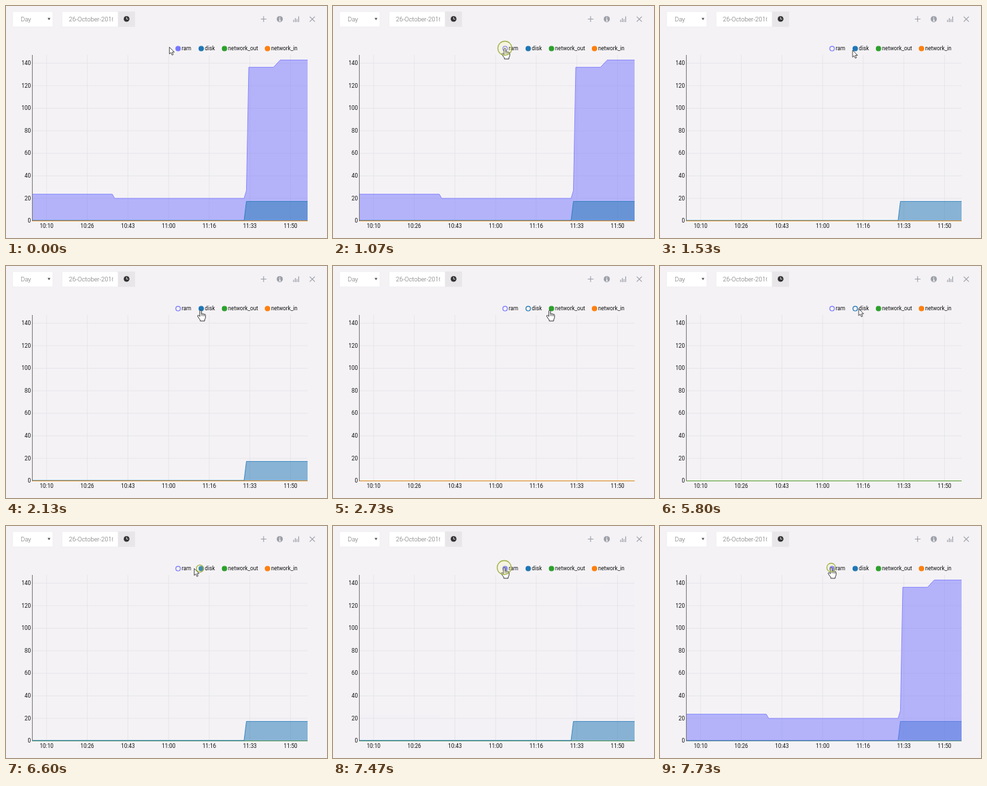
Write an HTML page that moves like this. It is 480 by 346 pixels and loops after 7790 ms.

```html
<!DOCTYPE html>
<html lang="en">
<head>
<meta charset="utf-8">
<title>Resource chart</title>
<style>
html, body { margin: 0; width: 100%; height: 100%; overflow: hidden; background: #f4f2f5; }
svg { display: block; width: 480px; height: 346px; }
.chart text { font: 8.2px Roboto, sans-serif; fill: #111; }
.form text { font: 300 9.4px Roboto, sans-serif; fill: #6c6c6c; }
.grid path { stroke: #e4e2e6; stroke-width: .8; }
.line { fill: none; stroke-width: .8; stroke-linejoin: round; }
.area { fill-opacity: .5; }
.icons { fill: none; stroke: #9da0a8; }
</style>
</head>
<body>
<svg viewBox="0 0 480 346" xmlns="http://www.w3.org/2000/svg">
  <defs><clipPath id="field"><path d="M90 8H160V31H90Z"/></clipPath></defs>
  <g class="form">
    <path d="M10 8.5H70V31H10ZM84 8.5H168V31H84Z" fill="#fff" stroke="#eae8eb" stroke-width=".5"/>
    <text x="22" y="23">Day</text>
    <path d="M62.2 17.8H66.4L64.3 21.2Z" fill="#555"/>
    <text x="94" y="23" clip-path="url(#field)">26-October-2016</text>
    <path d="M167.5 8.2H193V31.2H167.5Z" fill="#e8e6e9"/>
    <circle cx="180.3" cy="19.3" r="4.3" fill="#333"/>
    <path d="M180.3 16.4V19.6H182.6" fill="none" stroke="#eee" stroke-width=".9"/>
  </g>
  <g class="icons">
    <path d="M381 19.5H389.5M385.2 15.2V23.8" stroke-width="1.1"/>
    <circle cx="409.4" cy="19.6" r="4.6" fill="#9da0a8" stroke="none"/>
    <path d="M409.4 16.3V17.6M408.3 19H409.6V22.4M408 22.4H411" stroke="#fff" stroke-width="1"/>
    <path d="M430.1 24V20.5M432.6 24V18M435.1 24V19.5M437.6 24V15.5" stroke-width="1.2"/>
    <path d="M454.2 15.8L461.8 23.4M461.8 15.8L454.2 23.4" stroke-width="1.1"/>
  </g>
  <g class="chart">
    <g class="grid" id="grid"></g>
    <g id="plot"></g>
    <path d="M39.4 73V320.5" stroke="#555" stroke-width=".8"/>
    <g id="legend"></g>
  </g>
  <g id="cursor">
    <path id="arrow" d="M.3 .3V10.6L2.7 8.4L4.3 12.2L6.1 11.4L4.5 7.8H7.7Z" fill="#fff" stroke="#222" stroke-width=".8"/>
    <g id="hand">
      <path d="M-1.2 1.3Q-1.2 0 0 0T1.2 1.3V5.2Q2.5 4.4 3.5 5.5Q4.7 4.9 5.5 6Q7.3 5.6 7.3 7.5V10.7Q7.2 12.3 6 14V16H-.7V14.3Q-2.3 12.6-4.2 9.3Q-5 7.6-3.6 7.5Q-2.5 7.5-1.2 9.3Z" fill="#fff" stroke="#222" stroke-width=".9"/>
      <path d="M1.3 5.4V8.5M3.4 5.7V8.7M5.4 6.3V8.8" stroke="#222" stroke-width=".7"/>
    </g>
  </g>
  <circle id="halo" fill="#ffff80" fill-opacity=".16" stroke="#a5b34c" stroke-width="1.3"/>
</svg>
<script>
const LOOP = 7790, FADE = 250, RING = 390, LEFT = 39.5, RIGHT = 451;
const $ = id => document.getElementById(id);
const clamp = v => Math.max(0, Math.min(1, v));
const mix = (a, b, k) => a + (b - a) * k;
const ease = k => k * k * (3 - 2 * k);
const yOf = value => 320.5 - value * 1.68;

function add(parent, tag, attrs, text) {
  const el = document.createElementNS('http://www.w3.org/2000/svg', tag);
  set(el, attrs);
  if (text !== undefined) el.textContent = text;
  parent.append(el);
  return el;
}

function set(el, attrs) {
  for (const k in attrs) el.setAttribute(k, attrs[k]);
}

// Grid and axis labels
for (let v = 0; v <= 140; v += 20) {
  add($('grid'), 'path', { d: `M${LEFT} ${yOf(v)}H${RIGHT}` });
  add($('grid'), 'text', { x: 37, y: yOf(v) + 2.7, 'text-anchor': 'end' }, v);
}
['10:10', '10:26', '10:43', '11:00', '11:16', '11:33', '11:50'].forEach((label, i) => {
  const x = 60.7 + i * 60.8;
  add($('grid'), 'path', { d: `M${x} 73V320` });
  add($('grid'), 'text', { x, y: 331, 'text-anchor': 'middle' }, label);
});

// data: corners as [x, value]; off / on: clicks that hide and restore a series
const flat = [[LEFT, 0], [RIGHT, 0]];
const series = [
  { name: 'ram', color: '#7777ff', x: 257.3, off: 1070, on: 7470,
    data: [[LEFT, 23.7], [159, 23.7], [162.5, 20], [356, 20], [359.5, 27],
           [363, 136.4], [400, 136.4], [410, 142.8], [RIGHT, 142.8]] },
  { name: 'disk', color: '#1f77b4', x: 291.9, off: 2330, on: 6270,
    data: [[LEFT, .4], [356, .4], [359.5, 17.3], [RIGHT, 17.3]] },
  { name: 'network_out', color: '#2ca02c', x: 326.7, off: 3730, on: 5330, data: flat },
  { name: 'network_in', color: '#ff7f0e', x: 391, off: Infinity, on: Infinity, data: flat }
];
for (const s of series) {
  const line = 'M' + s.data.map(([x, v]) => `${x} ${yOf(v)}`).join('L');
  s.group = add($('plot'), 'g', {});
  add(s.group, 'path', { class: 'area', fill: s.color, d: `${line}V${yOf(0)}H${LEFT}Z` });
  add(s.group, 'path', { class: 'line', stroke: s.color, d: line });
  s.dot = add($('legend'), 'circle', { cx: s.x, cy: 63.6, r: 3.4, fill: s.color, stroke: s.color, 'stroke-width': 1.2 });
  s.label = add($('legend'), 'text', { x: s.x + 5.4, y: 66.3 }, s.name);
}

// Each glide: start, end, then the place where the cursor comes to rest
const home = { x: 244, y: 61 };
const glides = [
  [0, 870, 257, 63],
  [1200, 1610, 291, 66],
  [2400, 2770, 325, 66],
  [3030, 3330, 324.7, 63.3],
  [5450, 5940, 290, 63.5],
  [6400, 7000, 256, 62]
];

function cursorAt(t) {
  let { x, y } = home;
  for (const [from, to, toX, toY] of glides) {
    const k = ease(clamp((t - from) / (to - from)));
    x = mix(x, toX, k);
    y = mix(y, toY, k);
  }
  return { x, y };
}

function overLegend({ x, y }) {
  return series.some(s => {
    const start = s.x + 5.4, end = start + s.label.getComputedTextLength();
    return Math.hypot(x - s.x, y - 63.6) < 3.8 || (x > start && x < end && y > 59 && y < 68);
  });
}

// Restored series are stacked on top, in the order they come back
let restored = false;
function stack(back) {
  if (back === restored) return;
  restored = back;
  for (const s of back ? [...series].reverse() : series) $('plot').append(s.group);
}

const clicks = series.flatMap(s => [s.off, s.on]).filter(isFinite);

function render(t) {
  stack(t > 4600);
  for (const s of series) {
    const opacity = t < s.on ? 1 - clamp((t - s.off) / FADE) : clamp((t - s.on) / FADE);
    set(s.group, { opacity });
    set(s.dot, { 'fill-opacity': t < s.off || t >= s.on ? 1 : 0 });
  }

  const c = cursorAt(t), hand = overLegend(c);
  set($('cursor'), { transform: `translate(${c.x} ${c.y})` });
  set($('hand'), { visibility: hand ? 'visible' : 'hidden' });
  set($('arrow'), { visibility: hand ? 'hidden' : 'visible' });

  // A ring closes in on the place of the last click
  const click = clicks.find(at => t >= at && t < at + RING);
  set($('halo'), { visibility: click === undefined ? 'hidden' : 'visible' });
  if (click !== undefined) {
    const p = cursorAt(click);
    set($('halo'), { cx: p.x, cy: p.y, r: mix(10.5, 4.5, (t - click) / RING) });
  }
}

const start = performance.now();
function tick() {
  render((performance.now() - start) % LOOP);
  requestAnimationFrame(tick);
}
tick();
</script>
</body>
</html>
```
